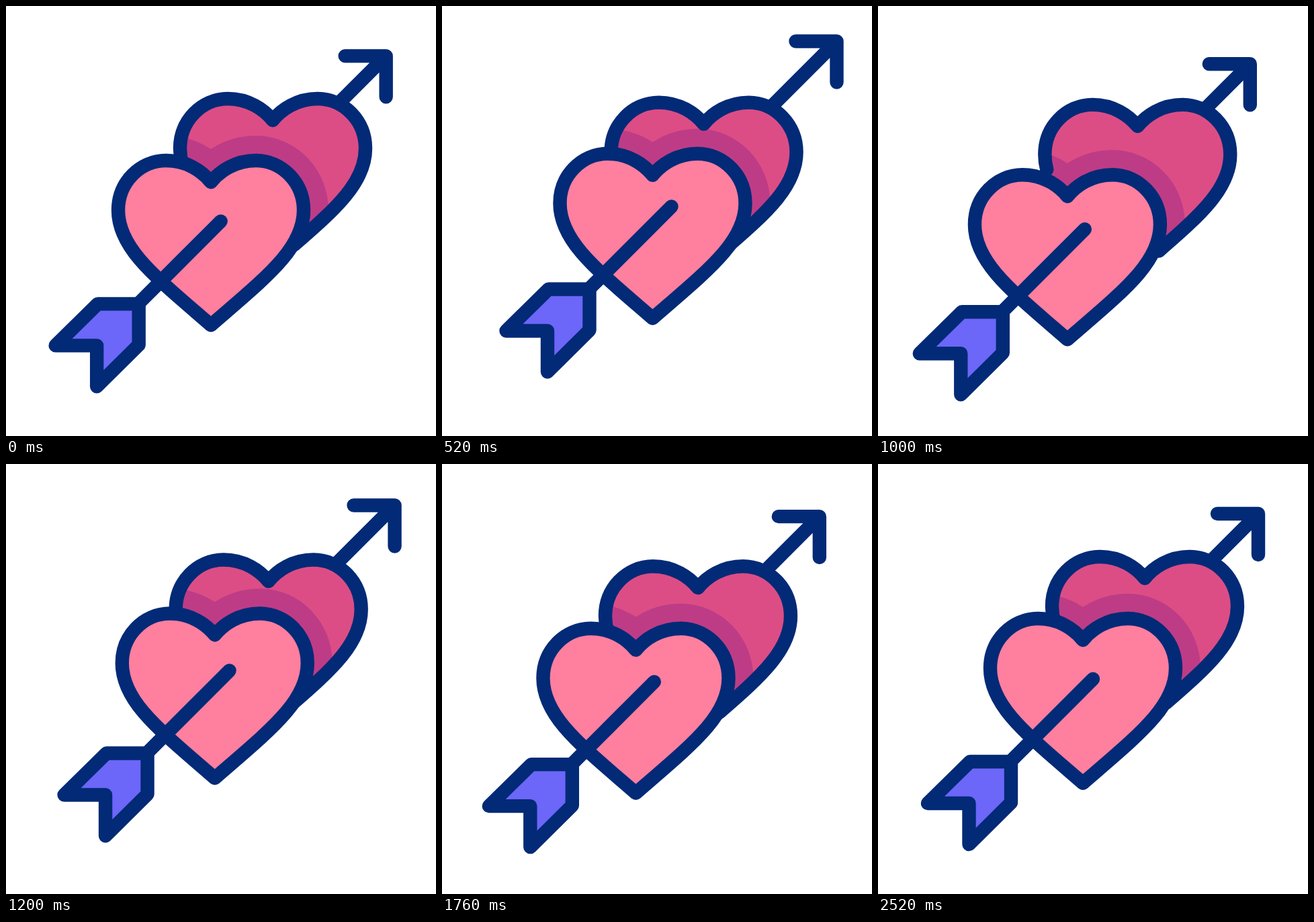
Animation of 640 by 640 pixels, one loop 2.92 s. Source, as an HTML page:

```html
<!DOCTYPE html>
<html lang="en">
<head>
<meta charset="utf-8">
<title>Hearts and arrow</title>
<style>
  html, body { margin: 0; width: 100%; height: 100%; overflow: hidden; background: #fff; }
  svg { display: block; width: 100%; height: 100%; }
</style>
</head>
<body>
<svg viewBox="0 0 640 640" fill="none" stroke="#032a76" stroke-width="20.4" stroke-linecap="round" stroke-linejoin="round">
  <defs>
    <path id="heart" pathLength="100" d="M305 262C318 246 341 230 372 230C411 230 443 263 443 304C443 361 388 403 305 475C222 403 167 361 167 304C167 263 199 230 238 230C269 230 292 246 305 262Z"/>
    <clipPath id="inside"><use href="#heart" class="back"/></clipPath>
  </defs>
  <path class="arrow" d="M566 74L400 240M505 74H566V135"/>
  <use href="#heart" class="back" fill="#dc4d86" stroke="none"/>
  <g clip-path="url(#inside)">
    <use href="#heart" class="front" stroke="#be3c86" stroke-width="74" stroke-linejoin="miter"/>
  </g>
  <!-- the rear outline is open where the front heart covers it -->
  <use href="#heart" class="back" stroke-dasharray="45 29.4 25.6 0"/>
  <use href="#heart" class="front" fill="#ff7f9f"/>
  <g class="arrow">
    <path d="M320 320L198 442"/>
    <path d="M137 443H198V504L135.5 566V505H74Z" fill="#6c66f9"/>
  </g>
</svg>
<script>
  const LOOP = 2920, STEP = 40, END = 2520, BEAT = 335;

  // Each part swings between its peaks, one per beat, and comes to rest.
  const parts = {
    arrow: { delay: -25, peaks: [-25, 42, -12.5, 21.5, -5.5], x: 0, drift: 0 },
    front: { delay: 0, peaks: [-20, 30, -22.5, 23.5, -19.7, 5.4], x: 0, drift: 1 },
    back: { delay: 70, peaks: [-20, 30, -15.5, 16.5, -15.5, 2.6], x: 92, drift: 1 }
  };

  const clamp = v => Math.max(0, Math.min(1, v));
  const ease = p => (1 - Math.cos(Math.PI * p)) / 2;

  function swing({ delay, peaks }, t) {
    const beats = Math.max(0, (t - delay) / BEAT), i = Math.floor(beats);
    const from = peaks[i - 1] ?? 0, to = peaks[i] ?? 0;
    return from + (to - from) * ease(beats - i);
  }

  function draw(ms) {
    const t = Math.floor((ms % LOOP) / STEP) * STEP;
    const lean = clamp(t / 200) * clamp((END - t) / 300);
    for (const [name, part] of Object.entries(parts)) {
      const s = part.x + swing(part, t), d = part.drift * lean;
      const move = `translate(${(s - 0.6 * d).toFixed(2)} ${(-s - 1.2 * d).toFixed(2)})`;
      for (const el of document.querySelectorAll("." + name)) el.setAttribute("transform", move);
    }
  }

  let start;
  function tick(now) {
    start ??= now;
    draw(now - start);
    requestAnimationFrame(tick);
  }
  draw(0);
  requestAnimationFrame(tick);
</script>
</body>
</html>
```
